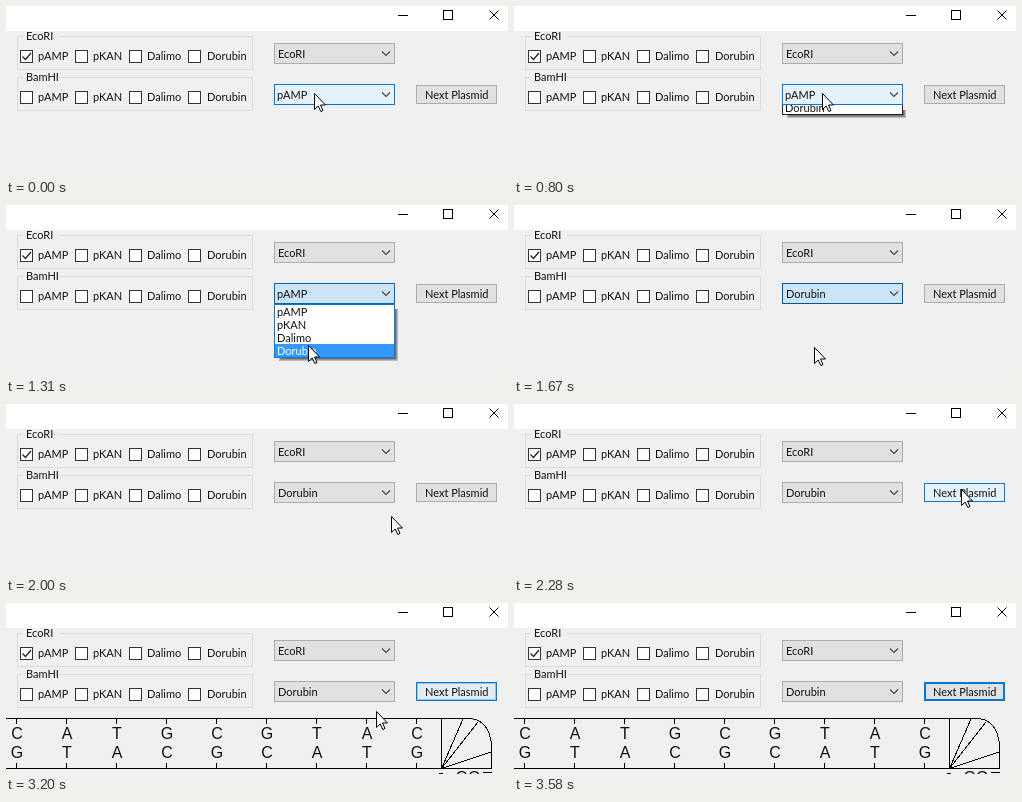
Animation of 502 by 171 pixels, one loop 3.84 s. Source, as an HTML page:

```html
<!DOCTYPE html>
<html lang="en">
<head>
<meta charset="utf-8">
<title>Plasmid picker</title>
<style>
html, body { margin: 0; width: 100%; height: 100%; overflow: hidden; background: #f0f0f0; }
svg { display: block; font: 11px Lato, sans-serif; fill: #111; }
.line { fill: none; stroke: #000; shape-rendering: crispEdges; }
.box { fill: #fff; stroke: #333; shape-rendering: crispEdges; }
.frame { fill: none; stroke: #dcdcdc; shape-rendering: crispEdges; }
.ctl { fill: #e1e1e1; stroke: #adadad; shape-rendering: crispEdges; }
.chev { fill: none; stroke: #444; stroke-width: 1.1; }
.dna { font: 16px "Liberation Sans", Arial, sans-serif; text-anchor: middle; }
.hot rect { fill: #3399ff; }
.hot text { fill: #fff; }

/* one loop is 3840 ms; 1% = 38.4 ms */
.anim { animation: 3840ms step-end infinite; }
#combo { animation-name: combo; }
#before { animation-name: before; }
#after { animation-name: after; }
#list { animation-name: list; }
#slide { animation-name: slide; }
#edge { animation-name: edge; }
#row0 { animation-name: row0; }
#row1 { animation-name: row1; }
#row2 { animation-name: row2; }
#row3 { animation-name: row3; }
#button { animation-name: button; }
#focus { animation-name: focus; }
#strand { animation-name: strand; }
#cursor { animation-name: cursor; }

@keyframes combo {
  0% { fill: #e5f1fb; stroke: #0078d7; }
  20.83% { fill: #e5f1fb; stroke: #0078d7; animation-timing-function: steps(4); }
  25.65% { fill: #cce4f7; stroke: #0067b8; }
  43.48% { fill: #cce4f7; stroke: #005499; animation-timing-function: steps(4); }
  48.31%, 100% { fill: #e1e1e1; stroke: #adadad; }
}
@keyframes before { 0% { visibility: visible; } 43.48%, 100% { visibility: hidden; } }
@keyframes after { 0% { visibility: hidden; } 43.48%, 100% { visibility: visible; } }
@keyframes list { 0% { opacity: 0; } 20.83% { opacity: 1; } 43.48%, 100% { opacity: 0; } }
@keyframes slide {
  0% { transform: translateY(-44px); }
  20.83% { transform: translateY(-44px); animation-timing-function: steps(4); }
  25.65%, 100% { transform: none; }
}
@keyframes edge { 0% { stroke: #222; } 25.65%, 100% { stroke: #0078d7; } }
@keyframes row0 { 0% { opacity: 1; } 28.07%, 100% { opacity: 0; } }
@keyframes row1 { 0% { opacity: 0; } 28.07% { opacity: 1; } 30.49%, 100% { opacity: 0; } }
@keyframes row2 { 0% { opacity: 0; } 30.49% { opacity: 1; } 34.11%, 100% { opacity: 0; } }
@keyframes row3 { 0% { opacity: 0; } 34.11%, 100% { opacity: 1; } }
@keyframes button {
  0% { fill: #e1e1e1; stroke: #adadad; }
  55.55% { fill: #e3e9ee; stroke: #5793c2; }
  56.77% { fill: #e5f1fb; stroke: #0078d7; }
  67.44% { fill: #cce4f7; stroke: #005499; }
  71.35% { fill: #e5f1fb; stroke: #0078d7; }
  81.04% { fill: #e5f1fb; stroke: #0078d7; animation-timing-function: steps(3); }
  84.67%, 100% { fill: #e1e1e1; stroke: #0078d7; }
}
@keyframes focus {
  0% { opacity: 0; }
  81.04% { opacity: 0; animation-timing-function: steps(3); }
  84.67%, 100% { opacity: 1; }
}
@keyframes strand { 0% { opacity: 0; } 70.05%, 100% { opacity: 1; } }
@keyframes cursor {
  0% { transform: translate(308px, 87px); }
  25.65% { transform: translate(308px, 87px); animation-timing-function: steps(3); }
  29.27% { transform: translate(313px, 125px); animation-timing-function: steps(4); }
  34.11% { transform: translate(302px, 140px); }
  35.41% { transform: translate(300px, 142px); }
  43.48% { transform: translate(300px, 142px); animation-timing-function: steps(3); }
  47.11% { transform: translate(316px, 139px); animation-timing-function: steps(4); }
  51.94% { transform: translate(385px, 112px); animation-timing-function: steps(4); }
  56.77% { transform: translate(431px, 90px); }
  58.07% { transform: translate(441px, 87px); }
  59.37% { transform: translate(447px, 85px); }
  78.64% { transform: translate(445px, 86px); animation-timing-function: steps(3); }
  82.26% { transform: translate(370px, 108px); animation-timing-function: steps(4); }
  87.09% { transform: translate(200px, 123px); animation-timing-function: steps(4); }
  91.92% { transform: translate(37px, 108px); opacity: 1; }
  93.22%, 100% { transform: translate(37px, 108px); opacity: 0; }
}
</style>
</head>
<body>
<svg width="502" height="171" viewBox="0 0 502 171">
  <defs>
    <clipPath id="below"><path d="M260 99H389V104H400V171H260z"/></clipPath>
    <g id="checks">
      <path class="frame" d="M17 30.5H11.5V63.5H246.5V30.5H53"/>
      <path class="box" d="M14.5 44.5h12v12h-12zM69.5 44.5h12v12h-12zM123.5 44.5h12v12h-12zM182.5 44.5h12v12h-12z"/>
      <text x="32" y="54">pAMP</text>
      <text x="87" y="54">pKAN</text>
      <text x="141" y="54">Dalimo</text>
      <text x="201" y="54">Dorubin</text>
    </g>
  </defs>

  <rect width="502" height="171" fill="#f0f0f0"/>
  <rect width="502" height="25" fill="#fff"/>
  <path class="line" d="M392 9.5h10M437.5 4.5h9v9h-9z"/>
  <path d="M483.5 4.5l9 9M492.5 4.5l-9 9" stroke="#000" fill="none"/>

  <use href="#checks"/>
  <use href="#checks" y="41"/>
  <text x="20" y="34">EcoRI</text>
  <text x="20" y="75">BamHI</text>
  <path d="M16.5 50.5l3 3 5.5-6.5" fill="none" stroke="#222" stroke-width="1.3"/>

  <rect class="ctl" x="268.5" y="37.5" width="120" height="20"/>
  <text x="272" y="52">EcoRI</text>
  <path class="chev" d="M376 45.5l4 4 4-4"/>

  <rect id="combo" class="ctl anim" x="268.5" y="78.5" width="120" height="20"/>
  <text id="before" class="anim" x="271" y="93">pAMP</text>
  <text id="after" class="anim" x="272" y="93">Dorubin</text>
  <path class="chev" d="M376 86.5l4 4 4-4"/>

  <rect id="button" class="ctl anim" x="410.5" y="79.5" width="80" height="18"/>
  <rect id="focus" class="anim" x="411.5" y="80.5" width="78" height="16" fill="none" stroke="#0078d7" shape-rendering="crispEdges"/>
  <text x="419" y="93">Next Plasmid</text>

  <g id="strand" class="anim">
    <path class="line" d="M0 115.5H462M0 165.5H486M435.5 115V166"/>
    <path id="ticks" class="line"/>
    <path class="line" d="M462 115.5C473 115.5 485.5 122 485.5 146V165M435.5 165.5L457 116M435.5 165.5L472 119M435.5 165.5L485 149"/>
    <g id="bases" class="dna"></g>
    <text class="dna" x="462" y="179.5">GG</text>
    <path class="line" d="M477 169.5h9M433 170.5h4"/>
  </g>

  <g clip-path="url(#below)">
    <g id="list" class="anim">
      <g id="slide" class="anim">
        <g fill="#000" fill-opacity=".22">
          <rect x="273" y="104" width="119" height="52"/>
          <rect x="274" y="103" width="117" height="52"/>
          <rect x="275" y="102" width="115" height="52"/>
        </g>
        <rect id="edge" class="anim" x="268.5" y="99.5" width="120" height="53" fill="#fff" stroke="#0078d7" shape-rendering="crispEdges"/>
        <g id="rows"></g>
      </g>
    </g>
  </g>

  <path id="cursor" class="anim" d="M.5.5V16.5L4.2 13 6.8 18.5 9 17.5 6.5 12H11.5z" fill="#fff" stroke="#000"/>
</svg>
<script>
const byId = id => document.getElementById(id);
const text = (x, y, s) => `<text x="${x}" y="${y}">${s}</text>`;

byId("rows").innerHTML = ["pAMP", "pKAN", "Dalimo", "Dorubin"].map((name, i) => {
  const y = 100 + 13 * i, label = text(271, y + 11, name);
  return `${label}<g id="row${i}" class="hot anim"><rect x="269" y="${y}" width="119" height="13"/>${label}</g>`;
}).join("");

const pair = { A: "T", T: "A", C: "G", G: "C" };
const bases = [..."CATGCGTAC"];
const baseX = i => 11 + 50 * i;
byId("bases").innerHTML = bases.map((b, i) =>
  text(baseX(i), 136, b) + text(baseX(i), 155, pair[b])).join("");
byId("ticks").setAttribute("d", bases.map((b, i) =>
  `M${baseX(i) - .5} 115v6m0 39v6`).join(""));
</script>
</body>
</html>
```
